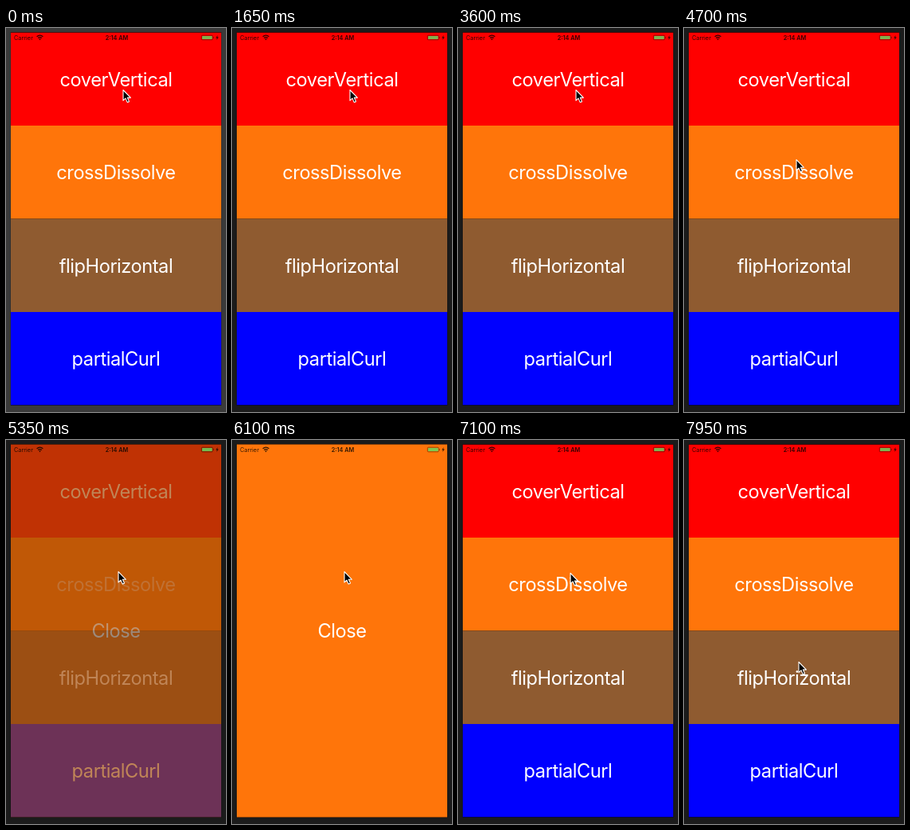
Write an HTML page that moves like this. It is 276 px wide and 480 px high and loops after 8000 ms.

```html
<!DOCTYPE html>
<html lang="en">
<head>
<meta charset="utf-8">
<title>Modal transitions</title>
<style>
  html, body { margin: 0; width: 100%; height: 100%; overflow: hidden; background: #1b1b1b; }
  svg { display: block; width: 100vw; height: 100vh; }
  text { font-family: Inter, "Liberation Sans", sans-serif; }
  .label { font-size: 23.6px; font-weight: 400; letter-spacing: -0.45px; fill: #fff; text-anchor: middle; }
  .status { font-size: 7.3px; fill: #000; opacity: .8; }
</style>
</head>
<body>
<svg viewBox="0 0 276 480">
  <defs><clipPath id="screenClip"><rect x="6" y="5.5" width="264" height="466"/></clipPath></defs>
  <rect id="bezel" width="276" height="480"/>
  <rect x="6" y="5.5" width="264" height="466" stroke="#000" stroke-opacity=".35"/>
  <g id="screen" clip-path="url(#screenClip)">
    <g id="menu"></g>
    <g id="modal">
      <rect id="modalFill" x="6" y="5" width="264" height="467"/>
      <text id="close" class="label" x="138" y="247">Close</text>
    </g>
  </g>
  <g class="status">
    <text x="10" y="14.6">Carrier</text>
    <g fill="none" stroke="#000" stroke-width="1.3">
      <path d="M38.6 10.8Q42.5 7.4 46.4 10.8"/>
      <path d="M40.2 12.6Q42.5 10.6 44.8 12.6"/>
    </g>
    <path d="M41.2 13.7Q42.5 12.6 43.8 13.7L42.5 15.2Z"/>
    <text x="139" y="14.6" text-anchor="middle" font-weight="600">2:14 AM</text>
    <rect x="245.3" y="9.2" width="14" height="5.6" rx="1.2" fill="none" stroke="#000" stroke-width=".5"/>
    <rect x="246" y="9.9" width="12.6" height="4.2" rx=".6" fill="#62dc62"/>
    <path d="M260 10.8q1.2 1.2 0 2.4z"/>
    <path d="M265.6 9L263.2 12.4H264.8L264.2 15L266.8 11.4H265.1Z"/>
  </g>
  <path id="cursor" d="M0 0V13.2L3 10.4L5.2 15.4L7.5 14.4L5.3 9.6H9.4Z"
        fill="#000" stroke="#fff" stroke-width="1.1" stroke-linejoin="round"/>
</svg>
<script>
const DURATION = 8000;
const RED = '#ff0000', ORANGE = '#ff750a';
const BANDS = [['coverVertical', RED], ['crossDissolve', ORANGE], ['flipHorizontal', '#8f5b30'], ['partialCurl', '#0000ff']];
const SCREEN_TOP = 5.5, BAND_HEIGHT = 116.5;

// Transition start times in ms
const COVER_IN = 1850, COVER_OUT = 2950;
const DISSOLVE_IN = 5170, DISSOLVE_OUT = 6515, DISSOLVE_TIME = 400;

const $ = id => document.getElementById(id);
const [bezel, screen, menu, modal, modalFill, closeLabel, cursor] =
  ['bezel', 'screen', 'menu', 'modal', 'modalFill', 'close', 'cursor'].map($);

function add(parent, tag, attributes, content = '') {
  const node = document.createElementNS('http://www.w3.org/2000/svg', tag);
  for (const name in attributes) node.setAttribute(name, attributes[name]);
  node.textContent = content;
  return parent.appendChild(node);
}

const labels = BANDS.map(([name, fill], i) => {
  const y = SCREEN_TOP + i * BAND_HEIGHT;
  add(menu, 'rect', { x: 6, y, width: 264, height: BAND_HEIGHT, fill });
  return add(menu, 'text', { class: 'label', x: 138, y: y + 67.3 }, name);
});

const progress = (t, start, length) => Math.min(1, Math.max(0, (t - start) / length));
const ease = p => p * p * (3 - 2 * p);
const mix = (a, b, p) => a + (b - a) * p;

function spring(t, start) {
  const x = 0.018 * Math.max(0, t - start);
  return t > start + 500 ? 1 : 1 - (1 + x) * Math.exp(-x);
}

// Opacity of a tapped label: dims on press, then recovers.
function tapOpacity(t, release) {
  return t < release - 80 ? 1 : mix(0.2, 1, progress(t, release, 470));
}

const CURSOR_MOVES = [[300, 900, 148, 77.5], [3750, 900, 141, 164.7], [7050, 700, 144, 277.5]];

function cursorAt(t) {
  let x = 147, y = 77.5;
  for (const [start, length, toX, toY] of CURSOR_MOVES) {
    const p = ease(progress(t, start, length));
    x = mix(x, toX, p);
    y = mix(y, toY, p);
  }
  return `translate(${x} ${y})`;
}

function draw(t) {
  const shade = mix(58, 27, ease(progress(t, 800, 400)));
  bezel.setAttribute('fill', `rgb(${shade},${shade},${shade})`);

  const covering = t < 4000;
  const slide = covering ? spring(t, COVER_IN) - spring(t, COVER_OUT) : 1;
  const appear = ease(progress(t, DISSOLVE_IN, DISSOLVE_TIME));
  const vanish = ease(progress(t, DISSOLVE_OUT, DISSOLVE_TIME));
  const shown = covering ? 1 : appear - vanish;

  modal.setAttribute('transform', `translate(0 ${(1 - slide) * 467})`);
  modal.setAttribute('opacity', shown);
  menu.setAttribute('opacity', covering ? 1 : 1 - shown);
  modalFill.setAttribute('fill', covering ? RED : ORANGE);

  // The incoming view is always on top while dissolving.
  screen.append(...(vanish > 0 ? [modal, menu] : [menu, modal]));

  labels[0].setAttribute('opacity', tapOpacity(t, COVER_IN - 40));
  labels[1].setAttribute('opacity', tapOpacity(t, DISSOLVE_IN - 30));
  closeLabel.setAttribute('opacity', tapOpacity(t, (covering ? COVER_OUT : DISSOLVE_OUT) - 30));
  cursor.setAttribute('transform', cursorAt(t));
}

const begin = performance.now();
function tick() {
  draw((performance.now() - begin) % DURATION);
  requestAnimationFrame(tick);
}
tick();
</script>
</body>
</html>
```
